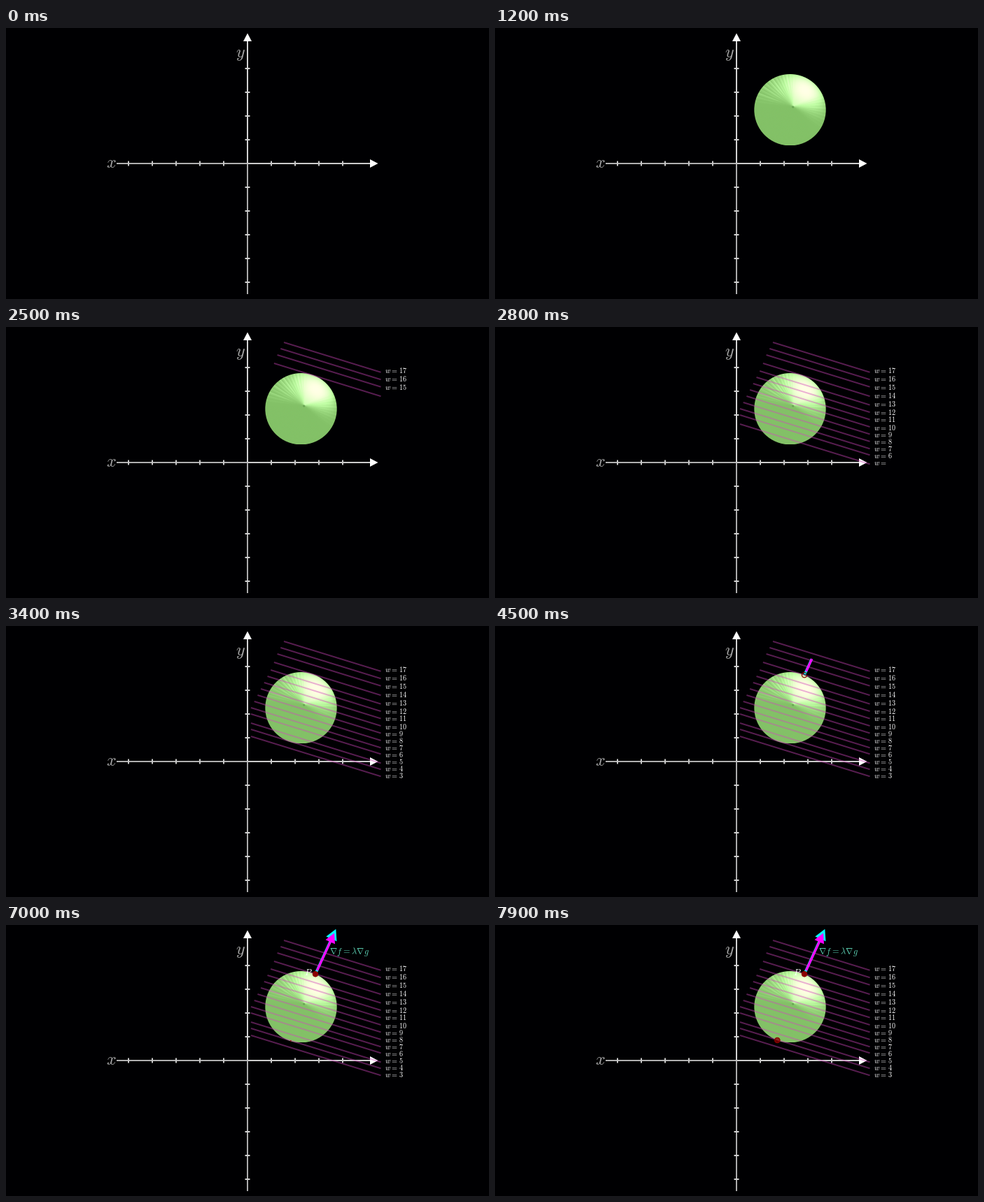
Recreate the animation shown at these times as a matplotlib script. Size 690 by 388 pixels, loop 8 s.

```python
import numpy as np
import matplotlib.pyplot as plt
from matplotlib.animation import FuncAnimation
from matplotlib.patches import Circle, Polygon

W, H, DPI = 690, 388, 100
STEP = 100
FRAMES = 80

plt.rcParams["mathtext.fontset"] = "cm"
plt.rcParams["toolbar"] = "None"
plt.rcParams["path.snap"] = False

fig = plt.figure(figsize=(W / DPI, H / DPI), dpi=DPI, facecolor="#000002")
ax = fig.add_axes([0, 0, 1, 1])
ax.axis("off")


def pt(px):
    return px * 72 / DPI


def line(xs, ys, color, width, **kw):
    kw.setdefault("solid_capstyle", "butt")
    return ax.plot(xs, ys, color=color, lw=pt(width), **kw)[0]


def label(x, y, text, size, color="white", **kw):
    return ax.text(x, y, text, fontsize=pt(size), color=color, **kw)


def ramp(x, a, b):
    u = np.clip((x - a) / (b - a), 0, 1)
    return u * u * (3 - 2 * u)


def smooth(t):
    """Sigmoid easing from 0 to 1."""
    t = min(max(t, 0), 1)
    low = 1 / (1 + np.exp(5))
    return (1 / (1 + np.exp(-10 * (t - 0.5))) - low) / (1 - 2 * low)


# Coordinate axes
OX, OY, UNIT = 345, 194, 34


def draw_axes():
    line([158, OX], [OY, OY], "#b0b0b0", 2)
    line([OX, 521], [OY, OY], "#cccccc", 2)
    line([OX, OX], [OY, 381], "#acacac", 2)
    line([OX, OX], [18, OY], "#d2d2d2", 2)
    for k in range(-5, 6):
        if k and k < 5:
            x = OX + k * UNIT
            line([x, x], [OY - 3.5, OY + 3.5], "#c8c8c8", 2)
        if k and k > -5:
            y = OY + k * UNIT
            line([OX - 3.5, OX + 3.5], [y, y], "#d0d0d0", 2)
    for tip in ([(531.5, OY), (520, OY - 6), (520, OY + 6)],
                [(OX, 7.5), (OX - 6, 19), (OX + 6, 19)]):
        ax.add_patch(Polygon(tip, fc="white", lw=0, zorder=3))
    label(150.4, 193, "$x$", 24, "#a8a8a8", ha="center", va="center")
    label(334.9, 37.2, "$y$", 24, "#a8a8a8", ha="center", va="center")


# Shaded ball with a fan of facets around its pole
CX, CY, R = 421.5, 117.2, 51.2
POLE = 425.7, 113


def ball_image(n=416):
    u = np.linspace(-1, 1, n)
    x, y = np.meshgrid(u, -u)
    z = np.sqrt(np.clip(1 - x**2 - y**2, 0, 1))
    light = np.clip(0.42 * x + 0.53 * y + 0.737 * z, 0, 1) ** 3

    dx, dy = CX + R * x - POLE[0], POLE[1] - CY + R * y
    angle = np.degrees(np.arctan2(dy, dx))
    light *= ramp(angle, -50, 32) * ramp(angle, 185, 75)

    # Each facet fades across its width
    wedge, across = np.divmod((angle + 180) / 6.5, 1)
    strength = np.random.default_rng(4).uniform(0.5, 1, 60)
    depth = strength[wedge.astype(int)] * (1 - across)
    reach = ramp(np.hypot(dx, dy), 4, 34)
    left = ramp(angle, 80, 105) * ramp(angle, 180, 150)
    right = ramp(angle, -45, -20) * ramp(angle, 30, 5)
    light *= 1 - 0.2 * (1 - depth) * (left + right)
    light += (0.3 * left + 0.1 * right) * depth * reach

    base = np.array([131, 193, 103]) / 255
    return np.clip(base + 0.5 * light[..., None], 0, 1)


def make_ball():
    edge = Circle((CX, CY), R, transform=ax.transData)
    image = ax.imshow(ball_image(), extent=(CX - R, CX + R, CY + R, CY - R),
                      aspect="auto", zorder=4)
    image.set_clip_path(edge)
    pole = Circle(POLE, 1.6, fc="#5f9a4b", alpha=0.7, lw=0, zorder=4.1)
    ax.add_patch(pole)
    return [image, pole]


# Level lines w = 17 ... 3
LEFT_Y = [22, 31, 40, 52, 63, 72, 81, 90, 99, 108, 117, 126, 139, 148, 158]
LABEL_Y = [63, 75, 87, 99, 110, 122, 133, 144, 155, 165, 175, 184, 195, 205, 215]
SLOPE, RIGHT = 0.309, 535.5
EQUALS = r"\hspace{0.08}=\hspace{0.08}"


class Level:
    def __init__(self, i):
        self.x, self.y = max(350, 397 - 4.7 * i), LEFT_Y[i]
        value = str(17 - i)
        self.parts = ["", "$w$", f"$w{EQUALS}$"]
        self.parts += [f"$w{EQUALS}{value[:k + 1]}$" for k in range(len(value))]
        self.size = len(self.parts)
        self.stroke = line([], [], "#d147bd", 2, alpha=0.42, zorder=5)
        self.text = label(541, LABEL_Y[i] + 3.5, "", 10.2, va="baseline", zorder=5)

    def show(self, done):
        """Draw the stroke first, then the label glyph by glyph."""
        run = (RIGHT - self.x) * min(max(done, 0), 1)
        xs = [self.x, self.x + run] if run else []
        self.stroke.set_data(xs, [self.y + SLOPE * (x - self.x) for x in xs])
        glyphs = int(min(max(done - 1, 0), self.size - 1) + 1e-6)
        self.text.set_text(self.parts[glyphs])


# Gradient arrows
DIR = np.array([29, -64]) / np.hypot(29, 64)
SIDE = np.array([-DIR[1], DIR[0]])


class Arrow:
    def __init__(self, tail, tip, color, width, length, half, z):
        self.tail, self.tip = np.array(tail), np.array(tip)
        self.neck = self.tip - DIR * length
        self.half = half
        self.shaft = line([], [], color, width, zorder=z)
        self.head = Polygon([tip] * 3, fc=color, lw=0, zorder=z)
        ax.add_patch(self.head)

    def show(self, s):
        end = self.tail + (self.neck - self.tail) * min(s / 0.65, 1)
        ends = np.array([self.tail, end]) if s > 0 else np.empty((0, 2))
        self.shaft.set_data(ends[:, 0], ends[:, 1])
        grow = max(0, (s - 0.65) / 0.35)
        wing = SIDE * self.half * grow
        point = self.neck + (self.tip - self.neck) * grow
        self.head.set_xy([point, self.neck + wing, self.neck - wing])
        self.head.set_visible(grow > 0)


class Dot:
    """A point whose border is traced before it fills."""

    def __init__(self, x, y):
        self.x, self.y = x, y
        self.fill = Circle((x, y), 4, fc="#8b0000", lw=0, zorder=8)
        ax.add_patch(self.fill)
        self.ring = line([], [], "#8b0000", 1.2, zorder=8)

    def show(self, seconds):
        part = min(max(seconds / 0.5, 0), 1)
        a = np.linspace(0, 2 * np.pi * part, 40) if part else np.empty(0)
        self.ring.set_data(self.x + 3.6 * np.cos(a), self.y + 3.6 * np.sin(a))
        self.fill.set_alpha(min(max((seconds - 0.45) / 0.65, 0), 1))


draw_axes()
ball = make_ball()
levels = [Level(i) for i in range(15)]
total = sum(v.size for v in levels)
arrows = [Arrow((442.5, 69), (471.3, 5.8), "cyan", 3.6, 15.5, 8.3, 6),
          Arrow((444.5, 65), (469, 11.5), "magenta", 3.2, 14, 7.4, 7)]
top_dot, low_dot = Dot(442, 70.2), Dot(403.3, 165)
notes = [
    label(462, 42.3, rf"$\nabla f{EQUALS}\lambda\nabla g$", 12.3, "#5cd0b3",
          va="baseline", zorder=9),
    label(432, 69, "$P$", 13, ha="center", va="center", zorder=7.5),
]
ax.set_xlim(0, W)
ax.set_ylim(H, 0)


def update(frame):
    ms = frame * STEP
    for part in ball:
        part.set_visible(ms >= 1200)

    done = total * smooth((ms - 2112) / 1005)
    for level in levels:
        level.show(done)
        done -= level.size

    s = smooth((ms - 4090) / 1000)
    for arrow in arrows:
        arrow.show(s)
    top_dot.show((ms - 4060) / 1000)
    low_dot.show((ms - 6960) / 1000)

    for note in notes:
        note.set_visible(ms >= 6200)


anim = FuncAnimation(fig, update, frames=FRAMES, interval=STEP,
                     repeat=True, repeat_delay=0, init_func=lambda: update(0))
plt.show()
```
